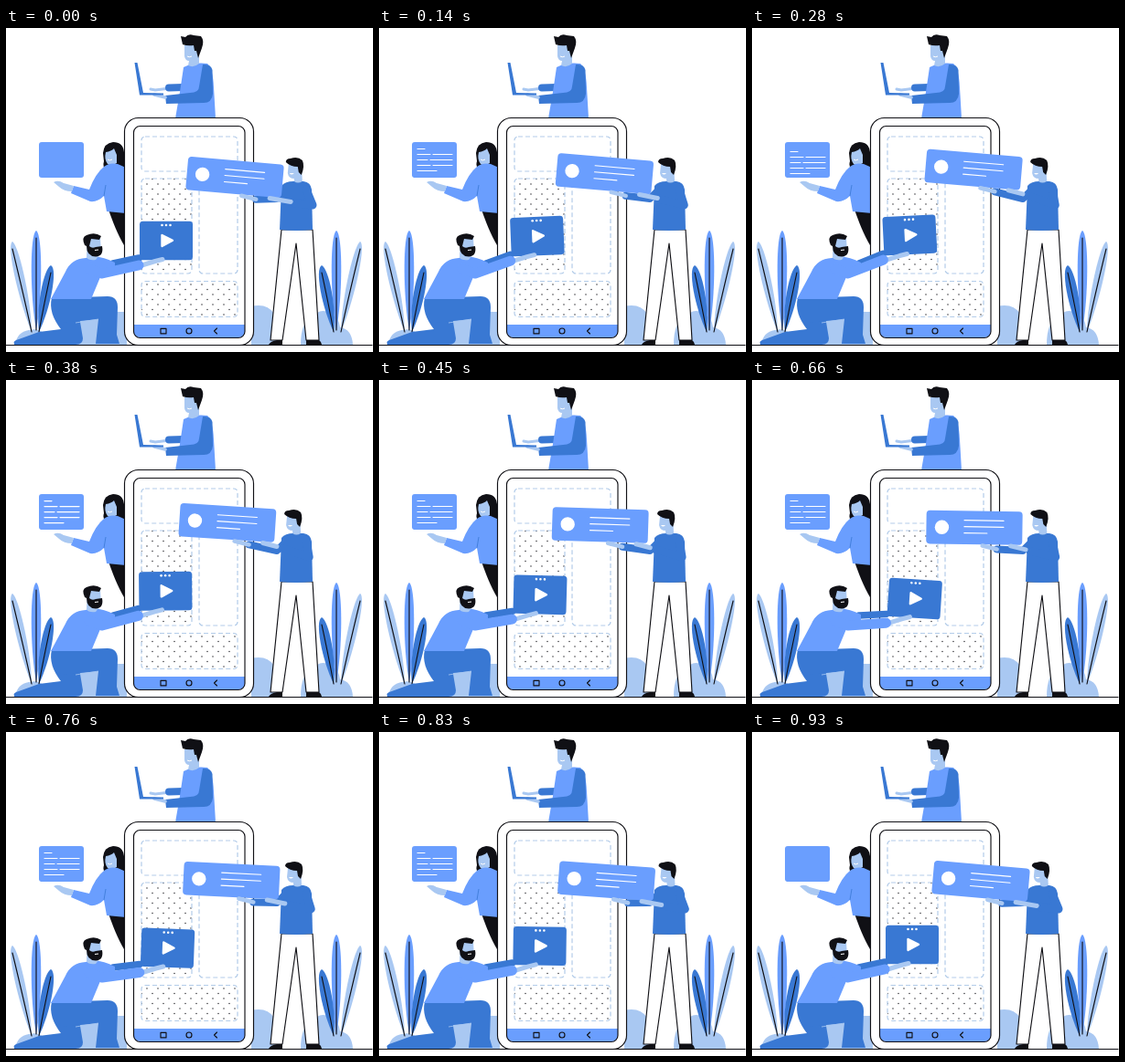
Animation, 401 px wide and 355 px high, one loop 1 s. Source, as an HTML page:

```html
<!DOCTYPE html>
<html lang="en">
<head>
<meta charset="utf-8">
<title>Building an app layout</title>
<style>
html, body { margin: 0; width: 100%; height: 100%; overflow: hidden; background: #fff; }
svg { display: block; width: 401px; height: 355px; }
.light { fill: #6a9efe; }
.dark { fill: #3978d3; }
.pale { fill: #a9c8f2; }
.ink { fill: #101015; }
.white { fill: #fff; }
.line { fill: none; stroke: #101015; stroke-width: 1.15; stroke-linecap: round; stroke-linejoin: round; }
.dash { fill: none; stroke: #b3cce9; stroke-width: 1.2; stroke-dasharray: 5 3; }
.text { fill: none; stroke: #fff; stroke-width: 1.15; stroke-linecap: round; }
.limb { fill: none; stroke-linecap: round; stroke-linejoin: round; }
.limb.light { fill: none; stroke: #6a9efe; }
.limb.dark { fill: none; stroke: #3978d3; }
.limb.pale { fill: none; stroke: #a9c8f2; }
</style>
</head>
<body>
<svg viewBox="0 0 401 355">
  <defs>
    <pattern id="dots" x="152" y="169" width="12" height="11" patternUnits="userSpaceOnUse">
      <circle class="ink" cx="2" cy="2" r=".65"/><circle class="ink" cx="8" cy="7.5" r=".65"/>
    </pattern>
    <g id="plant"></g>
  </defs>

  <!-- bushes and plants -->
  <path class="pale" d="M66 347Q66 322 82 318Q86 303 101 306Q113 302 121 311L132 311V347Z"/>
  <path class="pale" d="M268 305Q285 301 293 313Q300 321 300 347H268ZM322 347Q322 322 334 319Q343 304 356 314Q364 318 365 328Q378 330 379 347Z"/>
  <path class="pale" d="M10 347Q12 333 25 331Q42 327 48 347Z"/>
  <use href="#plant"/>
  <use href="#plant" transform="translate(394 0) scale(-1 1)"/>

  <!-- laptop worker -->
  <g>
    <path class="limb pale" stroke-width="3" d="M158 67L163 68L175 66.5"/>
    <path class="limb dark" stroke-width="8" d="M178 65.5L194 65"/>
    <path class="light" d="M194 43Q206 37 220 39Q226 44 227 65L229 99H185L190 70Z"/>
    <path class="pale" d="M195 19L211 18L211 39Q205 44 199 41L200 36Q196 36 195 31Z"/>
    <path class="ink" d="M193 18L191 9L196 10Q199 6 205 8L213 9Q217 14 214 22L210 33L208 25L206 25L205 19Q198 20 193 18Z"/>
    <path d="M198 31Q200 32.5 203 31" fill="none" stroke="#fff" stroke-width="1"/>
    <path class="dark" d="M215 40Q224 39 225.5 46L226 72Q225 82 216 82L175 83L174 74L201 71Q211 71 211 64Z"/>
    <path class="limb pale" stroke-width="3.6" d="M162 73L174 76"/>
    <path class="dark" d="M140.5 38L143.5 38L150 71L172 71.5V73.5H146Z"/>
  </g>

  <!-- woman -->
  <g>
    <path class="ink" d="M112 199H131V241Q122 228 112 199Z"/>
    <path class="ink" d="M106 137Q107 126 117 125Q128 125 129 136L131 158H110Q105 152 107 146Z"/>
    <path class="pale" d="M109 136Q115 135 118 132L121 139V148Q115 152 111 149Q107 144 109 136Z"/>
    <path d="M111 144Q113 146 116 144" fill="none" stroke="#fff" stroke-width="1"/>
    <path class="light" d="M107 152Q113 147 122 149L131 153V203L110 201L107 184Q100 191 92 190L71 181L74 173L91 177Q98 159 107 152Z"/>
    <path d="M107 184L109 172" fill="none" stroke="#3978d3" stroke-width=".8"/>
    <path class="pale" d="M52 169Q57 166 63 170L74 173L72 179Q63 179 58 174Z"/>
    <rect class="light" x="36" y="125" width="49" height="39" rx="3"/>
    <path id="note" class="text"/>
  </g>

  <!-- phone -->
  <path class="line" d="M0 347.5H400"/>
  <rect class="line" x="129.5" y="98.5" width="141" height="249" rx="15" style="fill:#fff"/>
  <path class="light" d="M139.5 325H261V332Q261 339 254 339H146.5Q139.5 339 139.5 332Z"/>
  <rect class="line" x="139.5" y="107.5" width="121.5" height="232" rx="7"/>
  <path class="line" d="M169 329.3h6v5.6h-6ZM230.5 329L227.5 332L230.5 335M203 332a3 3 0 1 0-6 0a3 3 0 1 0 6 0"/>
  <rect class="dash" x="148" y="119" width="105" height="38" rx="4"/>
  <rect class="dash" x="148" y="165" width="55" height="104" rx="4" style="fill:url(#dots)"/>
  <rect class="dash" x="211" y="165" width="42" height="104" rx="4"/>
  <rect class="dash" x="148" y="277.5" width="105" height="39" rx="4" style="fill:url(#dots)"/>

  <!-- kneeling man and video tile -->
  <g>
    <path id="kneelFar" class="limb dark" stroke-width="7.5"/>
    <g id="video">
      <rect class="dark" x="-29" y="-21.2" width="58" height="42.4" rx="3.5"/>
      <path d="M-4.5-6L7-.2L-4.5 6Z" fill="#fff" stroke="#fff" stroke-width="2.4" stroke-linejoin="round"/>
      <circle class="white" cx="-4.5" cy="-17" r="1.3"/><circle class="white" cy="-17" r="1.3"/><circle class="white" cx="4.5" cy="-17" r="1.3"/>
    </g>
    <path class="dark" d="M9 346Q7 343 14 341L36 333L60 330Q46 312 50 296H84L81 322L84 340Q84 347 76 347H9Z"/>
    <path class="dark" d="M50 296L111 294Q122 294 122 306L121 336L124 346H98L101 319L62 323Q48 318 50 296Z"/>
    <path d="M101 319L76 323" fill="none" stroke="#a9c8f2" stroke-width=".8"/>
    <path class="light" d="M87 252Q71 253 65 267L49 297H93L103 273L119 268V257Q108 251 94 250Z"/>
    <path class="pale" d="M89 231L103 230L104 246L98 254Q90 255 88 251Z"/>
    <path class="ink" d="M86 238Q82 229 88 227Q97 223 104 228L102 232L93 231L91 239Q94 242 98 240L105 239Q107 250 98 250.5Q88 250 88 239Z"/>
    <path d="M97 243.5L101 243" fill="none" stroke="#fff" stroke-width="1.1"/>
    <path id="kneelHand" class="limb pale" stroke-width="5"/>
    <path id="kneelNear" class="limb light" stroke-width="11"/>
  </g>

  <!-- standing man and list tile -->
  <g>
    <path class="line" d="M301 221L289 342H302L317 236L328 342H342L335 221Z" style="fill:#fff"/>
    <path class="ink" d="M302 342V347H287Q289 343 296 342ZM328 342H342Q345 344 345 347H328Z"/>
    <path id="farArm" class="limb dark" stroke-width="8"/>
    <path class="dark" d="M301 173Q305 168 314 168L325 168Q333 169 334 177L335 221Q317 223 299 221Z"/>
    <g id="head">
      <path class="pale" d="M307 149L321 147L322 168Q317 171 313 168V165Q307 165 306 159Z"/>
      <path class="ink" d="M304 147Q304 143 309 143Q317 140 322 145Q325 151 321 161L318 158L317 152Q309 152 304 147Z"/>
      <path d="M308 159Q310 162 313 159Z" fill="#fff"/>
    </g>
    <g id="list">
      <rect class="light" x="-52.5" y="-18.3" width="105" height="36.6" rx="4"/>
      <circle class="white" cx="-35.5" r="7.7"/>
      <path class="text" d="M-11-8H32M-11-1H32M-11 6H14"/>
    </g>
    <path id="farPalm" class="limb pale" stroke-width="4.5"/>
    <path id="nearArm" class="limb dark" stroke-width="9"/>
    <path id="nearPalm" class="limb pale" stroke-width="5"/>
  </g>
</svg>
<script>
const $ = id => document.getElementById(id);
const LOOP = 1000, END = 930;
const TIMES = [0, 70, 140, 210, 280, 380, 450, 520, 590, 660, 760, 830, END];

// turning points of each tile's swing: x, y, angle
const VIDEO = { rest: [175, 233, 0], up: [172, 226, -3.3], down: [178, 240, 4], upAt: 220, downAt: 600 };
const LIST = { rest: [250, 163.5, 5], up: [242, 155, 4.8], down: [241.5, 161.5, 0], upAt: 300, downAt: 560 };

function mix(a, b, t, from, to) {
  const k = (1 - Math.cos(Math.PI * (t - from) / (to - from))) / 2;
  return a.map((v, i) => v + (b[i] - v) * k);
}

function swing({ rest, up, down, upAt, downAt }, t) {
  if (t < upAt) return mix(rest, up, t, 0, upAt);
  if (t < downAt) return mix(up, down, t, upAt, downAt);
  return mix(down, rest, t, downAt, END);
}

function leaf(x, y, tx, ty, w, cls) {
  const lx = x + (tx - x) * 0.35, ly = y + (ty - y) * 0.35;
  return `<path class="${cls}" d="M${x} ${y}C${lx - w} ${ly} ${tx - w} ${ty + 4} ${tx} ${ty}` +
    `C${tx + w} ${ty + 4} ${lx + w} ${ly} ${x} ${y}Z"/>` +
    `<path class="line" d="M${x} ${y}Q${lx} ${ly} ${tx} ${ty + 8}"/>`;
}
$('plant').innerHTML = leaf(28, 333, 7, 234, 7, 'pale') +
  leaf(33, 331, 33, 222, 7, 'light') + leaf(36, 333, 49, 260, 8, 'dark');

const path = (id, ...pts) => $(id).setAttribute('d', 'M' + pts.map(p => p.join(' ')).join('L'));
const shift = (p, x, y) => [p[0] + x, p[1] + y];
const place = (id, [x, y, a]) => $(id).setAttribute('transform', `translate(${x} ${y}) rotate(${a})`);

// point given in a tile's own coordinates
function onTile([x, y, a], u, v) {
  const r = a * Math.PI / 180, c = Math.cos(r), s = Math.sin(r);
  return [x + u * c - v * s, y + u * s + v * c];
}

// rows appear from the top, then hop once
function note(t) {
  const rows = t < END ? Math.min(5, Math.floor(t / 28)) : 0;
  const hop = 3 * Math.exp(-(((t - 280) / 50) ** 2));
  let d = '';
  for (let i = 0; i < rows; i++) {
    const y = 132.5 + i * 6 + hop, gap = 53 + i % 2 * 3;
    d += i === 0 ? `M42 ${y}h8` : i === 4 ? `M42 ${y}h21` : `M42 ${y}H${gap}M${gap + 3} ${y}H80`;
  }
  $('note').setAttribute('d', d);
}

function draw(t) {
  const video = swing(VIDEO, t), list = swing(LIST, t);
  place('video', video);
  place('list', list);

  const grip = onTile(video, -4, 20.5), wrist = shift(grip, -21, 6);
  path('kneelHand', wrist, shift(grip, -8, 2), grip);
  path('kneelNear', [91, 264], [105, 269], shift(wrist, -5, 0.5));
  path('kneelFar', [117, 258], onTile(video, -30, 19));

  const far = onTile(list, 9, 19.5), farWrist = shift(far, 16, 4);
  path('farPalm', far, farWrist);
  path('farArm', farWrist, [296, 187], [305, 178]);

  const lean = (list[0] - 241.5) / 8.5;
  const near = onTile(list, 40, 19.5), nearWrist = shift(near, 15 + 8 * lean, 4);
  path('nearPalm', near, nearWrist);
  path('nearArm', [328, 177], [331 + 4 * lean, 194], shift(nearWrist, 5, 1.5));
  $('head').setAttribute('transform', `translate(${1.8 * lean} 0)`);
  note(t);
}

function tick() {
  const t = performance.now() % LOOP;
  draw(TIMES.filter(s => s <= t).pop());
  requestAnimationFrame(tick);
}
tick();
</script>
</body>
</html>
```
